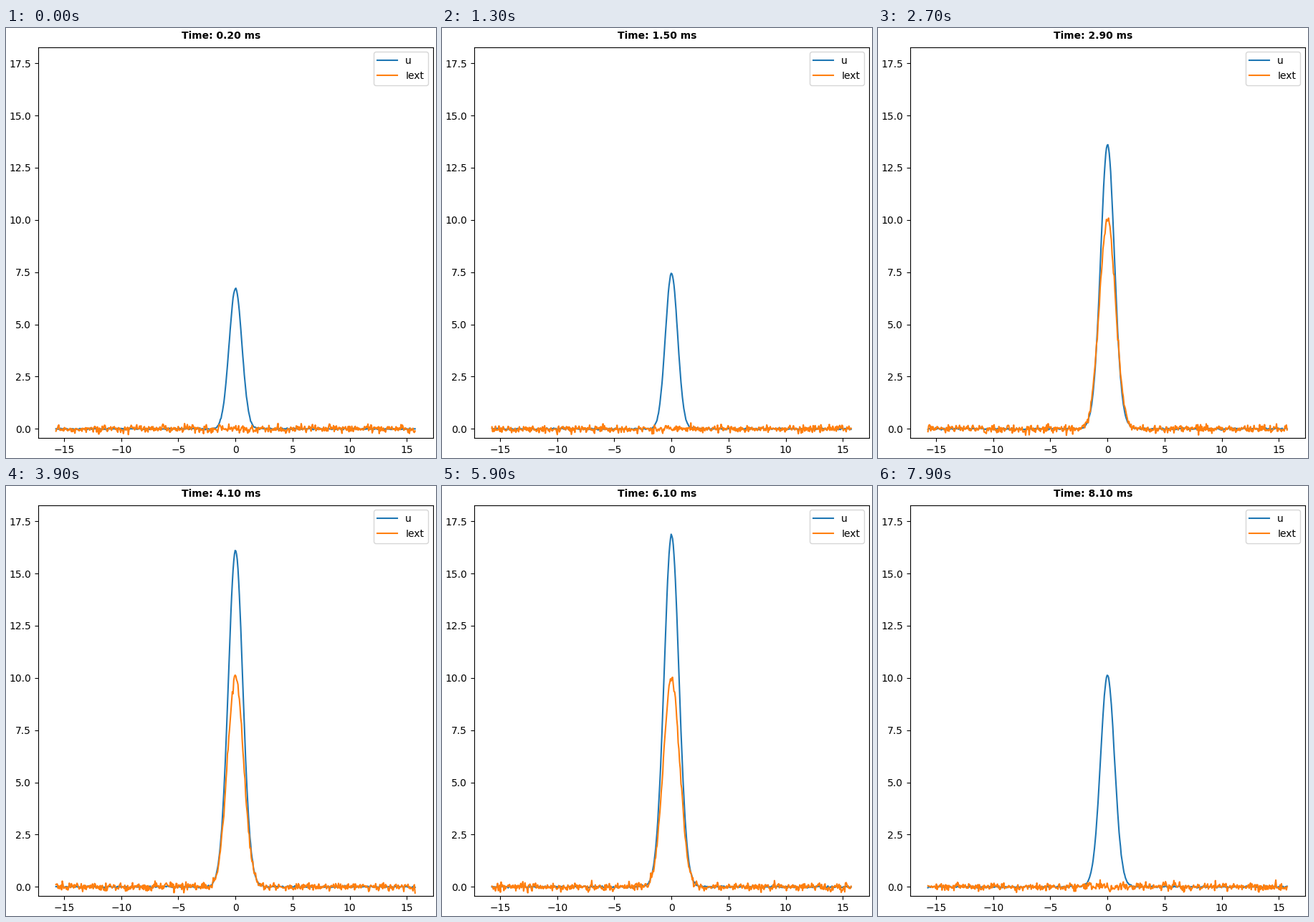
These frames come from a looping animation (600 px wide and 600 px high, 8 s). A matplotlib script:

```python
import numpy as np
import matplotlib.pyplot as plt
from matplotlib.animation import FuncAnimation

FRAMES, INTERVAL = 80, 100
DT, T0 = 0.1, 0.2
STIM_ON, STIM_OFF = 2.05, 7.05
NUM = 512
HALF = 5 * np.pi

plt.rcParams["font.family"] = "DejaVu Sans"
rng = np.random.default_rng(7)

x = np.linspace(-HALF, HALF, NUM)
times = T0 + DT * np.arange(FRAMES)


def bump(d, sigma):
    return np.exp(-0.5 * (d / sigma) ** 2)


def simulate():
    """Ring attractor with divisive normalisation, driven by a pulsed input."""
    d = x[:, None] - x[None, :]
    d = (d + HALF) % (2 * HALF) - HALF
    weights = 11.25 * bump(d, 0.36)
    stim = 10 * bump(x, np.sqrt(0.5))

    u = 6.72 * bump(x, 0.56) + rng.normal(0, 0.02, NUM)
    us, inputs = [], []
    for i, t in enumerate(times):
        ext = rng.normal(0, 0.1, NUM)
        if STIM_ON < t < STIM_OFF:
            ext = ext + stim
        if i > 0:
            rate = u ** 2
            rec = weights @ (rate / rate.sum())
            u = u + DT * (rec + ext - u)
        us.append(u)
        inputs.append(ext)
    return us, inputs


us, inputs = simulate()

fig = plt.figure(figsize=(6, 6), dpi=100, constrained_layout=True)
ax = fig.add_subplot()
u_line, = ax.plot(x, us[0], color="#1f77b4", label="u")
ext_line, = ax.plot(x, inputs[0], color="#ff7f0e", label="Iext")
ax.set_xlim(-1.1 * HALF, 1.1 * HALF)
ax.set_ylim(-0.44, 18.28)
ax.legend(loc="upper right")
title = fig.suptitle("Time: 0.20 ms", fontsize=10, fontweight="bold")


def update(i):
    u_line.set_ydata(us[i])
    ext_line.set_ydata(inputs[i])
    title.set_text(f"Time: {times[i]:.2f} ms")
    return u_line, ext_line, title


anim = FuncAnimation(fig, update, frames=FRAMES, interval=INTERVAL,
                     repeat=True, repeat_delay=0, blit=False)
plt.show()
```
